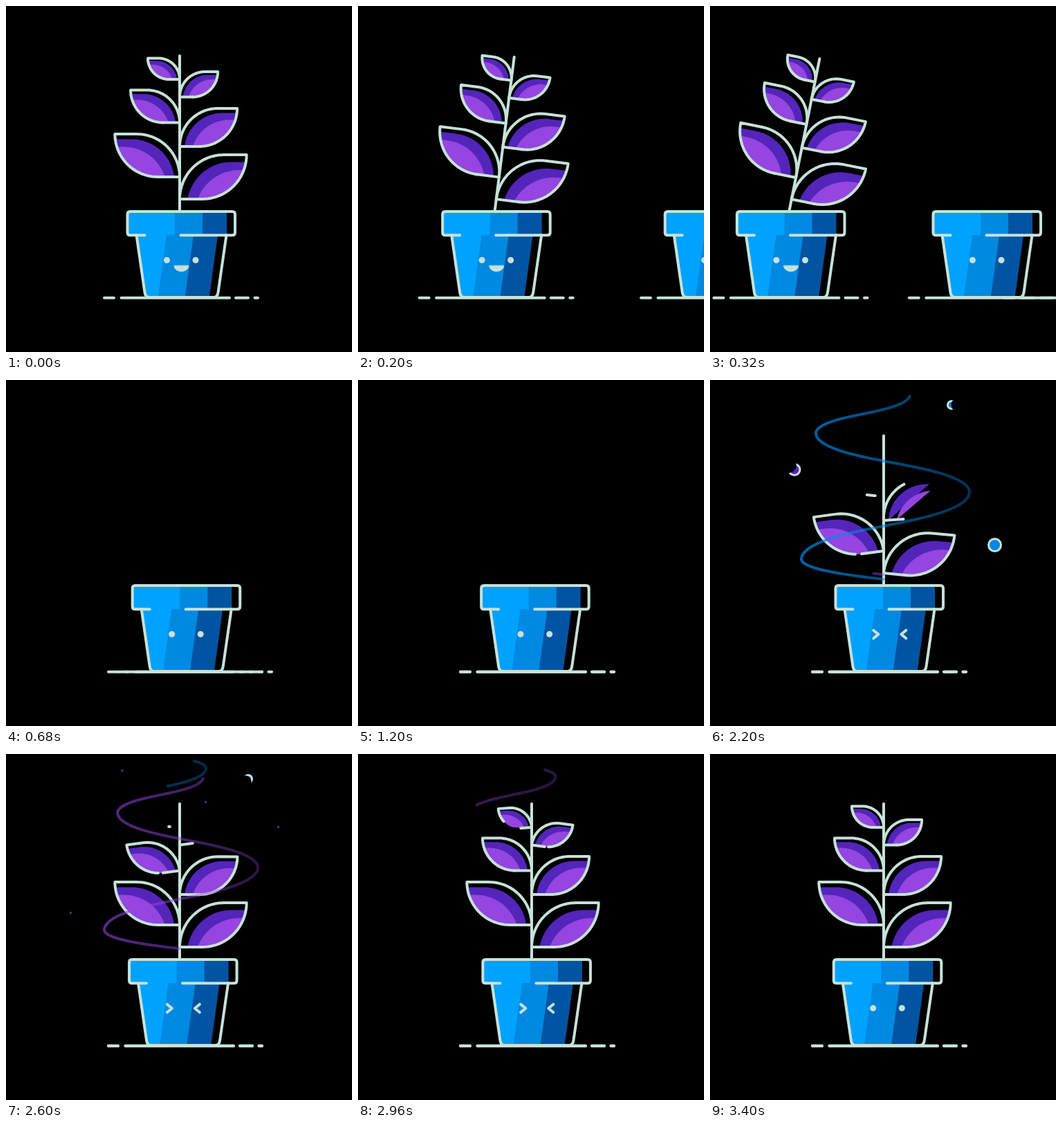
An HTML page with a canvas for the animation above (3840 ms loop, 500 px wide and 500 px high).

```html
<!DOCTYPE html>
<html>
<head>
<meta charset="utf-8">
<style>
  html, body { margin: 0; width: 100%; height: 100%; overflow: hidden; background: #000; }
  canvas { display: block; }
</style>
</head>
<body>
<canvas id="stage" width="500" height="500"></canvas>
<script>
const c = document.getElementById('stage').getContext('2d');
const LOOP = 3840, STEP = 40, Q = Math.PI / 2;
const LINE = '#c6e2d8', LIGHT = '#00a2ff', MID = '#0089e2', DARK = '#0054a2';
const VIOLET = '#9545e0', INDIGO = '#5425ba';

const ratio = (t, a, b) => Math.min(1, Math.max(0, (t - a) / (b - a)));
const smooth = (t, a, b) => { const p = ratio(t, a, b); return p * p * (3 - 2 * p); };
const mix = (a, b, u) => a + (b - a) * u;

function arc(cx, cy, from, to) {
  return Array.from({ length: 25 }, (_, i) => {
    const a = mix(from, to, i / 24);
    return [cx + Math.cos(a), cy + Math.sin(a)];
  });
}

// Part of a polyline between two fractions of its length
function trim(pts, from, to) {
  const len = [0];
  for (let i = 1; i < pts.length; i++)
    len.push(len[i - 1] + Math.hypot(pts[i][0] - pts[i - 1][0], pts[i][1] - pts[i - 1][1]));
  const total = len[len.length - 1], a = from * total, b = to * total;
  const at = d => {
    let i = 1;
    while (i < pts.length - 1 && len[i] < d) i++;
    const u = (d - len[i - 1]) / (len[i] - len[i - 1] || 1);
    return [0, 1].map(k => mix(pts[i - 1][k], pts[i][k], u));
  };
  return [at(a), ...pts.filter((_, i) => len[i] > a && len[i] < b), at(b)];
}

function trace(pts) {
  c.beginPath();
  pts.forEach(p => c.lineTo(p[0], p[1]));
}
function fill(pts, color) { trace(pts); c.fillStyle = color; c.fill(); }
function stroke(pts, color = LINE) { trace(pts); c.strokeStyle = color; c.lineWidth = 4; c.stroke(); }
function disc(x, y, r, color) {
  c.beginPath(); c.arc(x, y, r, 0, 2 * Math.PI);
  c.fillStyle = color; c.fill();
}

function ground(x) {
  for (const [a, b] of [[142, 156], [166.5, 323], [332, 350], [359.5, 364]])
    stroke([[a + x, 421.7], [b + x, 421.7]]);
}

const BODY = new Path2D('M188.5 331L200.5 414Q201.5 421 207 421H300Q305.5 421 306.5 414L318.5 331');
const RIM = new Path2D('M200.5 331.2H179.5Q175.5 331.2 175.5 327.2V301Q175.5 297 179.5 297H327Q331 297 331 301V327.2Q331 331.2 327 331.2H252.5');

function pot(x, face) {
  // Bands of shade: right edge on the rim, then on the body
  const bands = [[DARK, 319, 306], [MID, 284, 271], [LIGHT, 244, 232]];
  c.save();
  c.translate(x, 0);
  c.save();
  c.clip(BODY);
  for (const [color, , edge] of bands)
    fill([[180, 331], [edge, 331], [edge - 12.5, 422], [180, 422]], color);
  c.restore();
  c.fillStyle = '#000';
  c.fillRect(177, 298, 153, 33);
  for (const [color, edge] of bands) {
    c.fillStyle = color;
    c.fillRect(177, 298, edge - 177, 33);
  }
  c.strokeStyle = LINE; c.lineWidth = 4;
  c.stroke(BODY);
  c.stroke(RIM);
  for (const side of [-1, 1]) {
    const eye = 253.2 + 20.8 * side;
    if (face === 'squeeze')
      stroke([-5.8, 0, 5.8].map(y => [253.8 + side * (y ? 23.5 : 16.5), 367.5 + y]));
    else disc(eye, 367.3, 4.5, LINE);
  }
  if (face === 'smile') {
    c.beginPath();
    c.ellipse(253.5, 375.5, 10.5, 8, 0, 0, Math.PI);
    c.closePath();
    c.fillStyle = LINE; c.fill();
    c.lineWidth = 1; c.stroke();
  }
  c.restore();
}

// Leaves alternate right and left: base height, size, start time, shift of the fill
const LEAVES = [
  [279, 64, 1600, .165], [247, 62, 1720],
  [203, 55, 1920], [168.5, 47, 2120],
  [131.5, 36.5, 2480], [106, 30.5, 2560]
];

// Unit leaf; the fills are shifted copies of its upper edge
const lower = s => arc(.51, -1, Math.asin(s), Q);
const outline = [...arc(1, 0, 2 * Q, 3 * Q), ...lower(0)];
const blade = s => [...arc(1 + s, s, 2 * Q + Math.asin(s), 3 * Q), ...lower(s), [1 + s - Math.sqrt(1 - s * s), 0]];

function leaf([y, h, start, shift = .12], side, t) {
  const age = t - start;
  if (age <= 0) return;
  const grow = (pts, from) => trim(pts.map(p => [p[0] * h, p[1] * h]), 0, smooth(age, from, 530));
  const tilt = age < 685 ? 8 * Math.cos(Math.PI * (age - 160) / 350) : 0;
  c.save();
  c.translate(251, y);
  c.scale(side, 1);
  c.rotate(-tilt * Math.PI / 180);
  fill(grow(blade(shift), 70), INDIGO);
  fill(grow(blade(shift + .18), 70), VIOLET);
  if (age > 130) stroke(grow(outline, 130));
  const inner = .52 * h;
  stroke([[inner, 0], [inner * (1 - ratio(age, 30, 130)), 0]]);
  c.restore();
}

function plant(t) {
  const top = 296 - 224 * smooth(t, 1600, 2280);
  if (top > 295) return;
  LEAVES.forEach((l, i) => leaf(l, i % 2 ? -1 : 1, t));
  stroke([[251, 296], [251, top]]);
}

// Ribbons swing between turning points; the first and last lie beyond their ends
const TURNS = [[370, 317], [132, 259], [375, 162], [153, 77], [289, 21], [255, -1]];
const swirl = [];
for (let s = .5; s <= 4.5; s += .03125) {
  const i = Math.floor(s), u = s - i, [a, b] = [TURNS[i], TURNS[i + 1]];
  swirl.push([
    mix(a[0], b[0], (1 - Math.cos(Math.PI * u)) / 2),
    mix(a[1], b[1], u + .035 * Math.sin(2 * Math.PI * u))
  ]);
}
const inner = swirl.map(([x, y]) => [.9136 * x + 21.4, .93 * y + 13.5]);

function ribbon(pts, rgb, alpha, t, start) {
  const head = smooth(t, start, start + 490), tail = smooth(t, start + 440, start + 940);
  if (head <= 0 || tail >= 1) return;
  const shade = c.createLinearGradient(130, 0, 376, 0);
  shade.addColorStop(0, `rgba(${rgb},${alpha})`);
  shade.addColorStop(1, `rgba(${rgb},${alpha / 2})`);
  c.globalAlpha = 1 - .4 * tail;
  stroke(trim(pts, tail, head), shade);
  c.globalAlpha = 1;
}

// Bubbles: x, y, radius, colour, start, side from which they are eaten
const BUBBLES = [
  [122, 129.5, 8, INDIGO, 1710, -2.5],
  [411.5, 238.5, 9, MID, 1890, 1.5],
  [349, 36, 5.5, MID, 1860, 0],
  [350, 36, 5.5, MID, 2230, 2.4]
];
const SPARKS = [[168, 24, DARK], [288.5, 69.5, DARK], [393.5, 105.5, INDIGO], [93.5, 229.5, DARK]];

function bubble([x, y, r, color, start, side], t) {
  const a = (t - start) / (80 * r);
  if (a <= 0 || a >= 1) return;
  const size = r * (1 - (1 - ratio(a, 0, .4)) ** 2);
  disc(x, y, size + 1.5, LINE);
  if (size > 3) disc(x, y, size - 1.5, color);
  if (a > .5) {
    const d = (2 * r + 6) * 2 * (1 - a);
    disc(x + d * Math.cos(side), y + d * Math.sin(side), r + 3, '#000');
  }
}

function spark([x, y, color], t) {
  const a = ratio(t, 2230, 2630);
  if (a > 0 && a < 1) disc(x, y, 7 * Math.sin(Math.PI * a), color);
}

// Sliding in from the right, then trembling
const glide = (t, start, end) => 6 + 500 * (1 - ratio(t, start, end)) ** 1.75;

function tremble(t) {
  if (t < 1200) return 1.2;
  return t < 3360 ? -1.5 + 2 * Math.sin(.25 + .0405 * (t - 1720)) : -2.7;
}

function draw(t) {
  c.fillStyle = '#000';
  c.fillRect(0, 0, 500, 500);
  c.lineCap = c.lineJoin = 'round';

  if (t < 600) {
    const x = -136.5 * (t / 320) ** 2;
    ground(x);
    c.save();
    c.translate(251 + x, 296);
    c.rotate(11.4 * smooth(t, 0, 340) * Math.PI / 180);
    c.translate(-251, -296);
    plant(LOOP);
    c.restore();
    pot(x, 'smile');
  }
  const x = glide(t, 20, 600);
  ground(x);
  ground(glide(t, 143, 760));
  BUBBLES.forEach(b => bubble(b, t));
  SPARKS.forEach(s => spark(s, t));
  plant(t);
  ribbon(swirl, '0,137,226', .72, t, 1760);
  ribbon(inner, '149,69,224', .6, t, 2160);
  pot(x + tremble(t), t >= 1240 && t < 3080 ? 'squeeze' : 'plain');
}

function frame() {
  const t = performance.now() % LOOP;
  draw(Math.floor(t / STEP) * STEP);
  requestAnimationFrame(frame);
}
frame();
</script>
</body>
</html>
```
